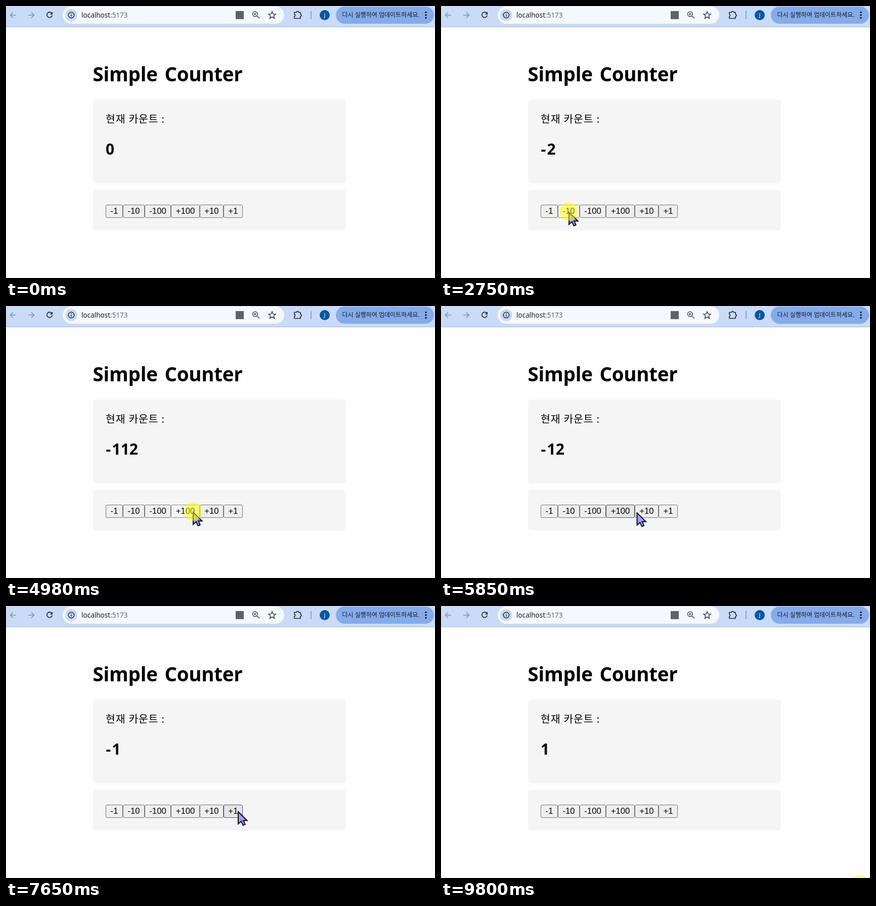
Write an HTML page that moves like this. It is 848x538 px and loops after 9870 ms.

```html
<!DOCTYPE html>
<html lang="ko">
<head>
<meta charset="utf-8">
<title>Simple Counter</title>
<style>
html, body { margin: 0; width: 100%; height: 100%; overflow: hidden; background: #fefefe; }
svg { display: block; }
text { font-family: "Noto Sans", "Noto Sans CJK KR", "Noto Sans CJK", sans-serif; }
.ko { font-weight: 300; }
.icon { fill: none; stroke: #474b52; stroke-width: 1.6; }
.btn rect { fill: #efefef; stroke: #767676; }
.btn.hover rect { fill: #e5e5e5; stroke: #4f4f4f; }
.btn.active rect { fill: #f5f5f5; stroke: #8d8d8d; }
.btn text { font: 16.67px "Liberation Sans", Arial, sans-serif; text-anchor: middle; }
.count { font-size: 30px; font-weight: 700; }
</style>
</head>
<body>
<svg width="848" height="538" viewBox="0 0 848 538">
  <rect width="848" height="538" fill="#fefefe"/>
  <path d="M0 537.5H848" stroke="#f0f0f0"/>

  <!-- browser bar -->
  <rect width="848" height="41" fill="#c9dbf7"/>
  <path d="M0 41.5H848" stroke="#a9b9d6"/>
  <g class="icon">
    <path d="M20 18H9M14 12.5L8.5 18L14 23.5M44 18H55M50 12.5L55.5 18L50 23.5" stroke="#8793a9"/>
    <path d="M90.5 14.5A5.3 5.3 0 1 0 91.3 18.5M91.3 12V16H87.3" stroke="#1f2329"/>
  </g>
  <rect x="112" y="1" width="438" height="34" rx="17" fill="#f5f8fe"/>
  <circle cx="129" cy="18" r="12" fill="#c9daf6"/>
  <g class="icon">
    <circle cx="129" cy="18" r="5.7" stroke="#2b3038"/>
    <path d="M129 17.3V21M129 14.7V16.1" stroke="#2b3038"/>
  </g>
  <text x="149" y="23" font-size="13.5" fill="#1f1f1f">localhost<tspan fill="#5f6368">:5173</tspan></text>
  <rect x="454" y="10" width="16" height="16" fill="#5f6368"/>
  <g class="icon">
    <circle cx="492.3" cy="16" r="4.7"/>
    <path d="M495.8 19.5L501 24.7M492.3 13.7V18.3M490 16H494.6"/>
    <path d="M526 11L528 15.8L533 16.2L529.2 19.5L530.4 24.5L526 21.8L521.6 24.5L522.8 19.5L519 16.2L524 15.8Z"/>
    <path d="M570 12.5H574.5A2 2 0 0 1 578.5 12.5H582V16.5A2 2 0 0 1 582 20.5V24.5H570V20.5A2.2 2.2 0 0 0 570 16.3Z" stroke="#22262c" stroke-linejoin="round"/>
  </g>
  <path d="M603 10V26" stroke="#7ea6e6" stroke-width="2"/>
  <circle cx="630" cy="18" r="10" fill="#07569f"/>
  <text x="630" y="22" font-size="11" fill="#fff" text-anchor="middle">J</text>
  <rect x="652" y="1" width="194" height="34" rx="17" fill="#85abe8"/>
  <text class="ko" x="664.5" y="22" font-size="12" fill="#101a2c">다시 실행하여 업데이트하세요.</text>
  <path d="M830 12.5v.01M830 18v.01M830 23.5v.01" stroke="#101a2c" stroke-width="3.6" stroke-linecap="round"/>

  <!-- page -->
  <text x="171.5" y="148.5" font-size="38.5" font-weight="700" letter-spacing="-.25" word-spacing="4">Simple Counter</text>
  <rect x="172" y="185" width="500" height="166" rx="6" fill="#f5f5f5"/>
  <rect x="172" y="364" width="500" height="80" rx="6" fill="#f5f5f5"/>
  <text class="ko" x="197" y="231" font-size="20.5" letter-spacing=".8">현재 카운트 :</text>
  <text class="count" id="sign" x="197.5" y="294">-</text>
  <text class="count" id="digits" y="294"></text>
  <g id="buttons"></g>

  <path id="cursor" d="M0 0V24L5.8 18.8L9.7 26.8L13.7 25L10.2 17.2H17.6Z" fill="#9f9ff2" stroke="#0c0c1c" stroke-width="2"/>
  <circle id="ring" r="18.3" fill="#ff0" opacity=".5"/>
</svg>
<script>
const LOOP = 9870, STEP = 69, HOLD = 130, HOVER_LAG = 75;
const TOP = 393, HEIGHT = 26;
const $ = id => document.getElementById(id);

// start, duration, x, y
const moves = [
  [180, 690, 220, 411],
  [2270, 210, 253, 408],
  [3560, 140, 319, 411],
  [4510, 200, 370, 408],
  [5850, 210, 410, 411],
  [6850, 200, 459, 407],
  [8990, 480, 828.5, 552]
];
const presses = [1070, 1880, 2750, 4030, 4980, 6260, 7260, 7720, 8380, 9800];

// Each button is as wide as its label plus padding, snapped to whole pixels.
let edge = 197;
const buttons = [-1, -10, -100, 100, 10, 1].map(value => {
  const label = value > 0 ? '+' + value : String(value);
  const textWidth = 16.67 * ((value > 0 ? .584 : .333) + .556 * (label.length - 1));
  const left = Math.round(edge);
  edge += textWidth + 19;
  const right = Math.round(edge);
  $('buttons').insertAdjacentHTML('beforeend',
    `<g class="btn">
       <rect x="${left + .5}" y="${TOP + .5}" width="${right - left - 1}" height="${HEIGHT - 1}" rx="2.5"/>
       <text x="${(left + right) / 2}" y="${TOP + 18}">${label}</text>
     </g>`);
  return { value, left, right, node: $('buttons').lastElementChild };
});

// The pointer advances in even time steps and slows down towards each stop.
function pointer(t) {
  let x = 519, y = 498;
  for (const [start, duration, toX, toY] of moves) {
    if (t < start) break;
    const steps = Math.round(duration / STEP) + 1;
    const done = Math.min(Math.floor((t - start) / STEP) + 1, steps) / steps;
    const k = 1 - (1 - done) ** 2;
    x += (toX - x) * k;
    y += (toY - y) * k;
  }
  return { x, y };
}

function buttonAt({ x, y }) {
  return y >= TOP && y < TOP + HEIGHT
    ? buttons.find(b => x >= b.left && x < b.right)
    : undefined;
}

const countAt = t => presses
  .filter(at => t >= at + HOLD)
  .reduce((sum, at) => sum + (buttonAt(pointer(at))?.value ?? 0), 0);

const show = (id, on) => $(id).style.display = on ? '' : 'none';
const place = (id, x, y) => $(id).setAttribute('transform', `translate(${x} ${y})`);

function draw(t) {
  const { x, y } = pointer(t);
  const down = presses.some(at => t >= at && t < at + HOLD);
  const hovered = buttonAt(pointer(t - HOVER_LAG));
  const count = countAt(t);

  place('cursor', x, y);
  place('ring', x - .5, y - 1.5);
  show('cursor', t >= moves[0][0]);
  show('ring', down);
  show('sign', count < 0);
  $('digits').setAttribute('x', count < 0 ? 209.5 : 197);
  $('digits').textContent = Math.abs(count);
  for (const b of buttons) {
    b.node.classList.toggle('hover', b === hovered);
    b.node.classList.toggle('active', b === hovered && down);
  }
}

const began = performance.now();
function tick() {
  draw((performance.now() - began) % LOOP);
  requestAnimationFrame(tick);
}
tick();
</script>
</body>
</html>
```
